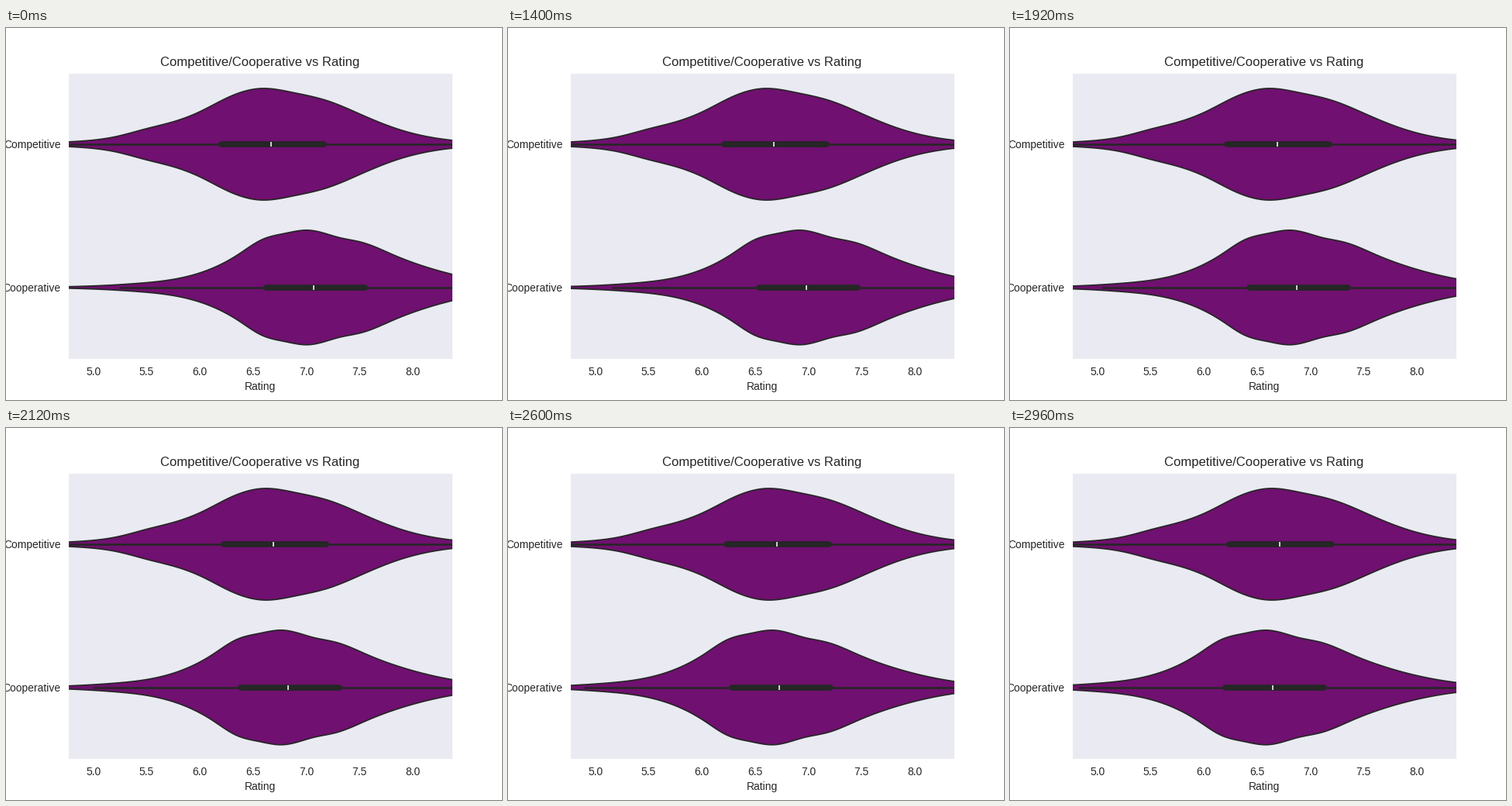
Recreate the animation shown at these times as a matplotlib script. Size 640x480 px, loop 5 s.

```python
import numpy as np
import matplotlib.pyplot as plt
from matplotlib.animation import FuncAnimation

plt.rcParams["font.family"] = "Liberation Sans"

FRAMES, INTERVAL = 125, 40
START, STEPS = 25, 49            # last resting frame, length of the slide
INK, FILL, PANEL = "#262626", "#701070", "#EAEAF2"
LW = 1.25
ROWS = (150, 334.8)

# Key points of each violin: x and half height, in stage pixels
COMPETITIVE = [(40, 1), (81, 3.1), (140, 9.5), (180, 19.8), (220, 30.3),
               (250, 42), (290, 62), (330, 72), (370, 66.8), (415, 56),
               (460, 37.5), (505, 19.8), (550, 8.7), (620, 1.5)]
COOPERATIVE = [(40, 0.4), (110, 1.9), (170, 5.3), (225, 12.2), (260, 22.3),
               (300, 42.8), (330, 61.6), (360, 69.8), (390, 73.9),
               (430, 64.4), (460, 58), (500, 42), (550, 24), (620, 8.3),
               (670, 2.5)]


def spline(points):
    """Natural cubic spline through the points, sampled at every pixel."""
    px, py = np.array(points, float).T
    h, slope = np.diff(px), np.diff(py) / np.diff(px)
    a, b = np.eye(len(px)), np.zeros(len(px))
    for k in range(1, len(px) - 1):
        a[k, k - 1:k + 2] = h[k - 1], 2 * (h[k - 1] + h[k]), h[k]
        b[k] = 6 * (slope[k] - slope[k - 1])
    m = np.linalg.solve(a, b)    # second derivatives at the points
    x = np.arange(px[0], px[-1] + 1)
    i = np.clip(np.searchsorted(px, x, side="right") - 1, 0, len(h) - 1)
    t = x - px[i]
    y = (py[i] + t * (slope[i] - h[i] * (2 * m[i] + m[i + 1]) / 6)
         + t**2 * m[i] / 2 + t**3 * (m[i + 1] - m[i]) / (6 * h[i]))
    return x, y


class Violin:
    def __init__(self, ax, points, y, whisker, box, median, shift):
        x, half = spline(points)
        self.shift = shift
        self.outline = np.column_stack([np.r_[x, x[::-1]],
                                        np.r_[y - half, y + half[::-1]]])
        self.body, = ax.fill(*self.outline.T, fc=FILL, ec=INK, lw=LW)
        width = LW * 4.5
        style = dict(color=INK, solid_capstyle="round")
        parts = [(whisker, dict(lw=width / 3, **style)),
                 (box, dict(lw=width, **style)),
                 ((median,), dict(marker="|", ms=width * 0.8, mew=width / 5,
                                  mec="white", ls="none"))]
        self.lines = [(ax.plot(xs, [y] * len(xs), **kw)[0], np.array(xs))
                      for xs, kw in parts]

    def move(self, p):
        dx = self.shift * p
        self.body.set_xy(self.outline + [dx, 0])
        for line, xs in self.lines:
            line.set_xdata(xs + dx)
        return [self.body] + [line for line, _ in self.lines]


fig = plt.figure(figsize=(6.4, 4.8), dpi=100, facecolor="white")
ax = fig.add_axes([0.125, 0.11, 0.775, 0.77], facecolor=PANEL)

violins = [
    Violin(ax, COMPETITIVE, ROWS[0], (50, 620), (278, 410), 342.42, 5.24),
    Violin(ax, COOPERATIVE, ROWS[1], (146.5, 700), (336, 463), 396.9, -57.8),
]

ax.set_xlim(80, 576)
ax.set_ylim(427.2, 57.6)
ax.set_xticks(112.8 + 68.65 * np.arange(7),
              [f"{5 + k / 2:.1f}" for k in range(7)])
ax.set_yticks(ROWS, ["Competitive", "Cooperative"])
ax.tick_params(left=False, bottom=False, labelcolor=INK)
for spine in ax.spines.values():
    spine.set_color("white")
ax.set_xlabel("Rating", color=INK)
ax.set_title("Competitive/Cooperative vs Rating", color=INK)


def update(frame):
    p = min(max((frame - START) / STEPS, 0), 1)
    return [artist for v in violins for artist in v.move(p)]


anim = FuncAnimation(fig, update, frames=FRAMES, interval=INTERVAL,
                     init_func=lambda: update(0), repeat=True, repeat_delay=0)
plt.show()
```
